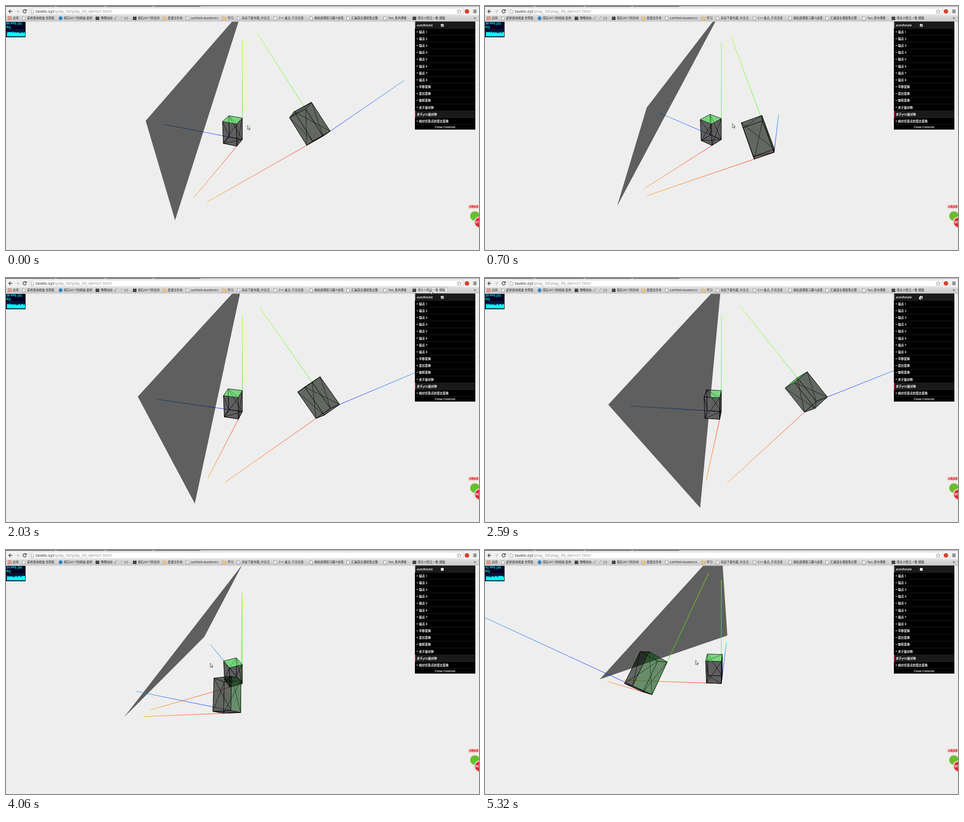
Animation, 1040 px wide and 539 px high, one loop 5390 ms. Source, as an HTML page:

```html
<!DOCTYPE html>
<html lang="zh">
<head>
<meta charset="utf-8">
<title>play_3d</title>
<style>
html, body { margin: 0; width: 100%; height: 100%; overflow: hidden; background: #eee; }
svg { display: block; width: 100%; height: 100%; }
text { font-family: 'Open Sans', 'Noto Sans CJK SC', 'Noto Sans CJK', sans-serif; font-size: 6.5px; white-space: pre; }
#panel text { fill: #fff; font-weight: 600; }
#fps text { font-family: 'Liberation Sans', sans-serif; font-weight: bold; font-size: 6.6px; fill: #0ff; }
</style>
</head>
<body>
<svg viewBox="0 0 1040 539">
  <defs id="defs">
    <clipPath id="stage"><rect y="34.5" width="1040" height="505"/></clipPath>
    <clipPath id="open"><path id="hole" clip-rule="evenodd"/></clipPath>
    <linearGradient id="bar" x2="0" y2="1"><stop stop-color="#dcdcdc"/><stop offset="1" stop-color="#c9c9c9"/></linearGradient>
  </defs>
  <rect width="1040" height="539" fill="#eee"/>

  <g clip-path="url(#stage)">
    <polygon id="planeBack" fill-opacity=".6"/>
    <g id="axes"></g>
    <g id="wires" fill="none" stroke="#000" stroke-width=".8" stroke-linejoin="round"></g>
    <g id="faces" clip-path="url(#open)"></g>
    <polygon id="planeFront" fill-opacity=".6"/>
  </g>

  <g id="browser">
    <rect width="1040" height="21" fill="#f1f1f1"/>
    <rect width="427" height="1.6" fill="#555"/>
    <rect x="427" width="613" height="1.6" fill="#aaa"/>
    <path d="M108 0h3v1.6h-3zM217 0h3v1.6h-3zM322 0h3v1.6h-3z" fill="#ddd"/>
    <rect x="52" y="4.5" width="953" height="14.5" rx="1.5" fill="#fff" stroke="#b5b5b5" stroke-width=".7"/>
    <g fill="none" stroke="#444" stroke-width="1.5">
      <path d="M14 11.8H6.5M10 8L6.2 11.8L10 15.6"/>
      <path d="M21 11.8H28.5M25 8L28.8 11.8L25 15.6" stroke="#ccc"/>
      <path d="M44 9.5A3.7 3.7 0 1 0 44.5 13M44.8 7.5V10.5H41.6"/>
      <path d="M1027.5 9H1034.5M1027.5 11.8H1034.5M1027.5 14.6H1034.5"/>
      <path d="M996.5 7.3L997.9 10.5L1001.2 10.8L998.7 13L999.5 16.3L996.5 14.6L993.5 16.3L994.3 13L991.8 10.8L995.1 10.5Z" stroke="#777" stroke-width=".8"/>
      <path d="M55.5 8H59.5L61.5 10V16H55.5Z" stroke="#777" stroke-width=".8"/>
    </g>
    <circle cx="1013.5" cy="12" r="5" fill="#d9402f"/>
    <text x="65" y="15.2" style="font-size:9px" fill="#888"><tspan fill="#222">tavelo.xyz</tspan>/play_3d/play_3d_demo1.html</text>
    <rect y="20.5" width="1040" height="14" fill="url(#bar)"/>
    <rect id="hover" x="893" y="21" width="78" height="12" rx="1.5" fill="#e4e4e4" stroke="#999" stroke-width=".7"/>
    <g id="marks" fill="#222"></g>
  </g>

  <g id="fps">
    <rect y="35" width="43" height="34" fill="#002"/>
    <rect x="1.5" y="51" width="40.5" height="16.5" fill="#113"/>
    <path id="graph" fill="#0ff"/>
    <text id="rate" x="1" y="40.8"/>
    <text x="1" y="48.8">61)</text>
  </g>

  <g id="panel"></g>

  <g>
    <path d="M1016 439H1040V448H1030L1027 452L1024 448H1016Z" fill="#f8d9d9"/>
    <text x="1017.5" y="445.3" style="font-size:5.3px;font-weight:700" fill="#d00">点我加速</text>
    <circle cx="1031" cy="464" r="10.5" fill="#6abf2e"/>
    <circle cx="1042" cy="478" r="13" fill="#fff" stroke="#bbb" stroke-width=".8"/>
    <circle cx="1042" cy="478" r="11" fill="#e3262b"/>
    <text id="badge" x="1032" y="480.3" fill="#fff" style="font-weight:700"/>
  </g>

  <path id="cursor" d="M0 0V9L2.2 7L3.7 10.2L5.1 9.5L3.7 6.5H6.4Z" fill="#fff" stroke="#000" stroke-width=".7"/>
</svg>

<script>
const LOOP = 5390, STEP = 70;
const CX = 519.6, CY = 295, FOCAL = 617, PLANE = 25, AXIS = 20;
const $ = id => document.getElementById(id);

function add(parent, tag, attrs, text) {
  const el = document.createElementNS('http://www.w3.org/2000/svg', tag);
  set(el, attrs);
  if (text) el.textContent = text;
  parent.appendChild(el);
  return el;
}
function set(el, attrs) {
  for (const k in attrs) el.setAttribute(k, attrs[k]);
}

// Rows are [time, ...values]
function tween(keys, t) {
  let i = 0;
  while (i < keys.length - 2 && t >= keys[i + 1][0]) i++;
  const [a, b] = [keys[i], keys[i + 1]];
  const k = Math.min(1, Math.max(0, (t - a[0]) / (b[0] - a[0])));
  return a.slice(1).map((v, j) => v + (b[j + 1] - v) * k);
}
const hold = (keys, t) => keys.filter(k => k[0] <= t).pop()[1];

// azimuth, elevation (degrees), distance
const CAMERA = [
  [0, 111.9, 29, 59.2], [280, 107.7, 29.3, 59.2], [560, 112, 30, 59.2], [700, 129.4, 31.7, 59.2],
  [1120, 123.3, 32, 59.2], [1330, 120.25, 32.1, 62.1], [1680, 110.6, 31.9, 59.2], [2030, 105.2, 31.9, 59.2],
  [2870, 92.3, 32, 59.2], [3430, 92.3, 32, 59.2], [3500, 106, 32.5, 59.2], [4060, 154.2, 36.5, 62.1],
  [4690, 186.8, 32.4, 56.2], [4830, 186.8, 32.4, 56.2], [5320, 183.8, 32.2, 56.2]
];
const POINTER = [
  [0, 531, 264], [700, 544, 260], [1330, 577, 253], [1680, 800, 120], [1890, 930, 27], [2170, 935, 27],
  [2240, 945, 38], [2660, 956, 40], [2940, 956, 40], [3360, 617, 236], [3430, 617, 236],
  [4060, 449, 250], [4690, 466, 246], [5320, 463, 244]
];
const FPS = [[0, 60], [280, 48], [560, 36], [1120, 33], [1680, 36], [2310, 35], [2870, 34], [4340, 38], [4760, 41]];

// Mirror in the plane x + y - 2z = 25
function mirror([x, y, z]) {
  const k = (x + y - 2 * z - 25) / 3;
  return [x - k, y - k, z + 2 * k];
}
const same = p => p;

function makeCamera(az, el, r) {
  const a = az * Math.PI / 180, e = el * Math.PI / 180;
  const ca = Math.cos(a), sa = Math.sin(a), ce = Math.cos(e), se = Math.sin(e);
  return {
    pos: [r * ce * sa, r * se, r * ce * ca],
    project([x, y, z]) {
      const near = x * sa + z * ca;
      const s = FOCAL / (r - near * ce - y * se);
      return [CX + s * (x * ca - z * sa), CY - s * (y * ce - near * se)].map(v => +v.toFixed(2));
    }
  };
}

// Corner bits: 1 = x, 2 = y, 4 = z; the diagonal joins the first and third corner
const QUADS = [[3, 1, 5, 7], [0, 2, 6, 4], [6, 2, 3, 7], [0, 1, 5, 4], [4, 5, 7, 6], [1, 0, 2, 3]];
const GREEN = 'rgb(48,193,55)', DARK = '#000', TINT = 'rgb(5,14,5)';
const AXIS_COLORS = [['#f00', '#f90'], ['#0f0', '#9f0'], ['#00f', '#09f']];

function makeBody(move, fills, id) {
  const corners = [...Array(8).keys()].map(i => move([i & 1 ? 3 : 0, i & 2 ? 5 : 0, i & 4 ? 3 : 0]));
  const group = add($('faces'), 'g', {});
  return {
    corners, group,
    middle: move([1.5, 2.5, 1.5]),
    root: move([0, 0, 0]),
    faces: QUADS.map((q, i) => add(group, 'polygon', { fill: fills[i], 'fill-opacity': .6 })),
    wire: add($('wires'), 'path', {}),
    axes: AXIS_COLORS.map(([from, to], i) => {
      const gid = 'axis' + id + i;
      const grad = add($('defs'), 'linearGradient', { id: gid, gradientUnits: 'userSpaceOnUse' });
      add(grad, 'stop', { 'stop-color': from });
      add(grad, 'stop', { offset: 1, 'stop-color': to });
      const line = add($('axes'), 'line', { stroke: `url(#${gid})`, 'stroke-width': .9 });
      return { grad, line, tip: move([0, 1, 2].map(j => j === i ? AXIS : 0)) };
    })
  };
}
const bodies = [
  makeBody(same, [DARK, DARK, GREEN, DARK, DARK, DARK], 'a'),
  makeBody(mirror, [TINT, 'rgb(17,75,20)', 'rgb(35,165,42)', 'rgb(18,6,6)', TINT, TINT], 'b')
];

const sub = (a, b) => a.map((v, i) => v - b[i]);
const dot = (a, b) => a.reduce((s, v, i) => s + v * b[i], 0);
const mean = ps => [0, 1, 2].map(i => ps.reduce((s, p) => s + p[i], 0) / ps.length);

function drawBody(b, cam) {
  const pts = b.corners.map(cam.project);
  let wire = '';
  QUADS.forEach((q, i) => {
    const [p0, p1, p2, p3] = q.map(k => pts[k]);
    wire += `M${p0}L${p1}L${p2}L${p3}ZL${p2}`;
    const c = mean(q.map(k => b.corners[k]));
    const facing = dot(sub(c, b.middle), sub(cam.pos, c)) > 0;
    set(b.faces[i], { points: facing ? [p0, p1, p2, p3].join(' ') : '' });
  });
  set(b.wire, { d: wire });
  const [x1, y1] = cam.project(b.root);
  for (const { grad, line, tip } of b.axes) {
    const [x2, y2] = cam.project(tip);
    set(grad, { x1, y1, x2, y2 });
    set(line, { x1, y1, x2, y2 });
  }
}

function drawScene(t) {
  const cam = makeCamera(...tween(CAMERA, t));
  bodies.forEach(b => drawBody(b, cam));
  const dist = b => { const d = sub(b.middle, cam.pos); return dot(d, d); };
  [...bodies].sort((a, b) => dist(b) - dist(a)).forEach(b => $('faces').appendChild(b.group));

  const tri = [[PLANE, 0, 0], [0, PLANE, 0], [0, 0, PLANE]].map(cam.project);
  const inFront = cam.pos[0] + cam.pos[1] + cam.pos[2] > PLANE;
  set($('planeFront'), { points: inFront ? tri.join(' ') : '' });
  set($('planeBack'), { points: inFront ? '' : tri.join(' ') });
  // The plane hides faces behind it but lets lines through
  set($('hole'), { d: 'M-900-900H2000V1500H-900Z' + (inFront ? `M${tri.join('L')}Z` : '') });
}

function drawFps(t) {
  $('rate').textContent = `${hold(FPS, t)} FPS (${t < 2870 ? 31 : 30}-`;
  const shift = Math.floor(t / 280);
  let d = 'M2 67';
  for (let x = 0; x < 40; x++) {
    const n = Math.abs(Math.sin((x + shift) * 12.9898) * 43758.5453) % 1;
    d += `V${(n > .72 ? 60 : 57 + n * 1.6).toFixed(1)}h1`;
  }
  set($('graph'), { d: d + 'V67Z' });
}

function buildMarks() {
  const g = $('marks');
  const icons = {
    doc: x => add(g, 'path', { d: `M${x - 2.5} 23.5h3.5l2 2v5.5h-5.5z`, fill: '#fff', stroke: '#666', 'stroke-width': .7 }),
    folder: x => add(g, 'path', { d: `M${x - 4} 24h3l1 1h4v5.5h-8z`, fill: '#f0c878', stroke: '#b98a3a', 'stroke-width': .6 }),
    square: x => add(g, 'rect', { x: x - 4, y: 23.5, width: 8, height: 7.5, fill: '#444' }),
    disc: x => add(g, 'circle', { cx: x, cy: 27, r: 4.2, fill: '#2a86c8' })
  };
  for (let i = 0; i < 9; i++)
    add(g, 'rect', { x: 4 + i % 3 * 3, y: 23 + Math.floor(i / 3) * 3, width: 2, height: 2, fill: ['#d54', '#d54', '#c63'][i % 3] });
  add(g, 'text', { x: 15, y: 29.4 }, '应用');
  [
    ['doc', 39, '星桥游戏频道 世界影'], ['disc', 120, '砚石3017的频道-星桥'], ['square', 201, '噜噜哒哒 - ( ゜- ゜)つ'],
    ['square', 283, '砚石3017的空间'], ['folder', 348.5, '新建文件夹'], ['doc', 399, 'Larkfield Academics'],
    ['folder', 480, '学习'], ['doc', 511, '岚谷下载专题_中文汉'], ['doc', 592, 'C++ 重点_千页文库'],
    ['doc', 671, '微机原理复习题7(含答'], ['doc', 752, '汇编语言课程笔记整'], ['doc', 833, 'Tavi_青舟博客'],
    ['square', 898, '晴天小院又一集 橘猫']
  ].forEach(([icon, x, label]) => {
    icons[icon](x);
    add(g, 'text', { x: x + 7.3, y: 29.4 }, label);
  });
  add(g, 'text', { x: 1028.5, y: 29.2, style: 'font-size:9px' }, '»');
}

let tick;
function buildPanel() {
  const g = $('panel'), H = 15.17;
  add(g, 'rect', { x: 899, y: 34.5, width: 133, height: 238.5 });
  const rows = ['autoRotate', ...[1, 2, 3, 4, 5, 6, 7, 8].map(n => '端点 ' + n),
    '平移变换', '变比变换', '旋转变换', '关于面对称', '关于yOz面对称', '相对任意点的变比变换'];
  rows.forEach((label, i) => {
    const y = 34.5 + i * H, flat = i === 0 || i === 13;
    if (flat) {
      add(g, 'rect', { x: 899, y, width: 133, height: H, fill: '#1a1a1a' });
      add(g, 'rect', { x: 899, y, width: 1.6, height: H, fill: i ? '#e61d3f' : '#806787' });
    } else {
      add(g, 'path', { d: `M903.5 ${y + 5.6}l2.3 1.7l-2.3 1.7z`, fill: '#fff' });
    }
    add(g, 'rect', { x: 899, y: y + H - .6, width: 133, height: .6, fill: '#333' });
    add(g, 'text', { x: flat ? 903.3 : 908, y: y + 10 }, label);
  });
  add(g, 'rect', { x: 956.3, y: 39.8, width: 6, height: 6, rx: .8, fill: '#fff' });
  tick = add(g, 'path', { d: 'M957.5 42.8l1.5 1.6l2.3-3.4', fill: 'none', stroke: '#222', 'stroke-width': 1.1 });
  add(g, 'text', { x: 965.5, y: 269.8, 'text-anchor': 'middle' }, 'Close Controls');
}

function draw(t) {
  drawScene(t);
  drawFps(t);
  const [x, y] = tween(POINTER, t);
  set($('cursor'), { transform: `translate(${x.toFixed(1)} ${y.toFixed(1)})` });
  set($('hover'), { visibility: y < 34 ? 'visible' : 'hidden' });
  set(tick, { visibility: t < 2870 ? 'visible' : 'hidden' });
  $('badge').textContent = t < 280 ? '87' : '88';
}

buildMarks();
buildPanel();
const start = performance.now();
function loop() {
  const t = (performance.now() - start) % LOOP;
  draw(Math.floor(t / STEP) * STEP);
  requestAnimationFrame(loop);
}
loop();
</script>
</body>
</html>
```
